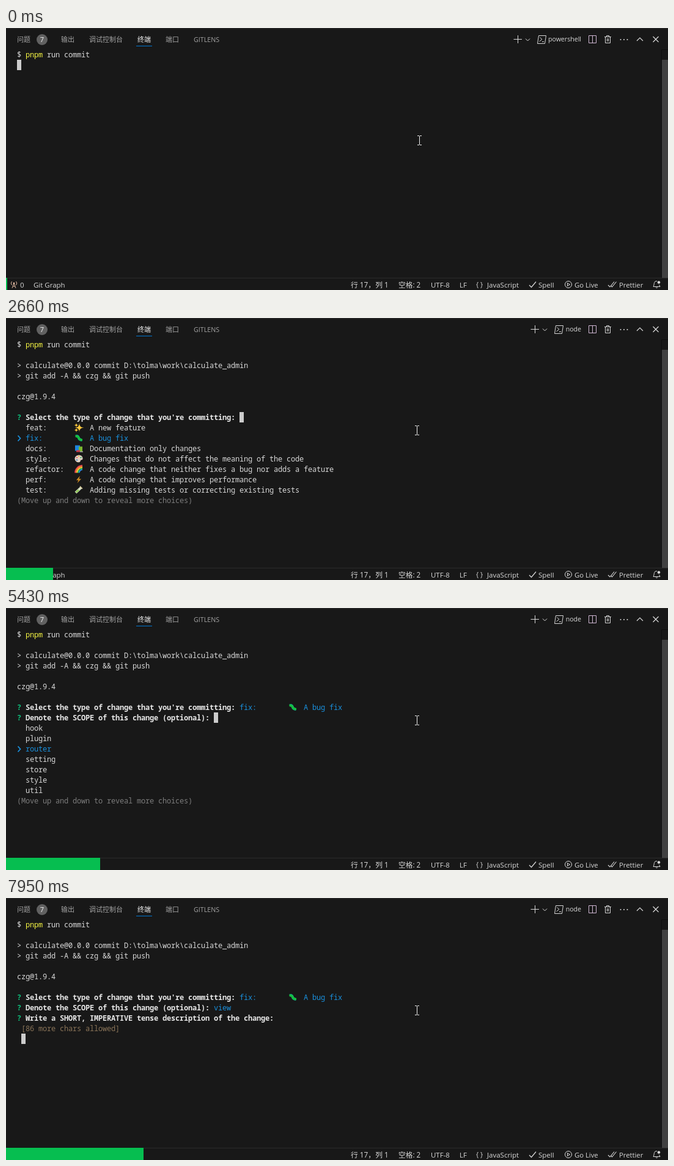
Write an HTML page with a canvas that moves like this. It is 1083 by 429 pixels and loops after 8 s.

```html
<!DOCTYPE html>
<html lang="zh-CN">
<head>
<meta charset="utf-8">
<title>Terminal commit</title>
<style>
html, body { margin: 0; width: 100%; height: 100%; overflow: hidden; background: #181818; }
canvas { display: block; }
</style>
</head>
<body>
<canvas id="stage" width="1083" height="429"></canvas>
<script>
const ctx = document.getElementById('stage').getContext('2d');
const LOOP = 8000, LEFT = 18, TOP = 35, CELL = 7, LINE = 17;
const FG = '#d8d8d8', WHITE = '#e8e8e8', BLUE = '#1a8fdb', GREEN = '#0dbc79', DIM = '#7c7c7c';
const UI = '"Open Sans", "Noto Sans CJK SC", "Noto Sans CJK", sans-serif';
const MONO = '"Noto Sans Mono", monospace';

const types = [
  ['feat:', 'A new feature'],
  ['fix:', 'A bug fix'],
  ['docs:', 'Documentation only changes'],
  ['style:', 'Changes that do not affect the meaning of the code'],
  ['refactor:', 'A code change that neither fixes a bug nor adds a feature'],
  ['perf:', 'A code change that improves performance'],
  ['test:', 'Adding missing tests or correcting existing tests']
];
const scopes = ['api', 'asset', 'component', 'enum', 'hook', 'plugin', 'router',
  'setting', 'store', 'style', 'util', 'view', '', 'empty'];

// Moments at which the terminal changes, in ms
const at = { hover: 300, run: 540, output: 670, czg: 1300, types: 2200, fix: 2590,
  scopes: 3080, firstDown: 4355, repeat: 205, done: 6640 };

// ---- drawing helpers ----
function box(x, y, w, h, color) {
  ctx.fillStyle = color;
  ctx.fillRect(x, y, w, h);
}
function dot(x, y, r, color) {
  ctx.fillStyle = color;
  ctx.beginPath();
  ctx.arc(x, y, r, 0, 7);
  ctx.fill();
}
function stroke(path, color = FG, width = 1) {
  ctx.strokeStyle = color;
  ctx.lineWidth = width;
  ctx.stroke(new Path2D(path));
}
function fill(path, color) {
  ctx.fillStyle = color;
  ctx.fill(new Path2D(path));
}
function label(text, x, y, size, color = FG, align = 'left') {
  ctx.font = `${size}px ${UI}`;
  ctx.textAlign = align;
  ctx.fillStyle = color;
  ctx.fillText(text, x, y);
}
function put(row, col, text, color = FG, bold = false) {
  ctx.font = `${bold ? 'bold ' : ''}12px ${MONO}`;
  ctx.textAlign = 'center';
  ctx.fillStyle = color;
  [...text].forEach((ch, i) => ctx.fillText(ch, LEFT + (col + i + 0.5) * CELL, TOP + row * LINE + 13));
}
function caret(row, col) {
  box(LEFT + col * CELL, TOP + row * LINE, CELL, LINE, '#cccccc');
}
function pointer(row) {
  const y = TOP + row * LINE + 9;
  stroke(`M19.5 ${y - 4.5}L23.5 ${y}L19.5 ${y + 4.5}`, BLUE, 1.8);
}

// ---- small pictures in the list, each centred on 0,0 ----
const star = (x, y, r) => fill(`M${x} ${y - r}Q${x} ${y} ${x + r} ${y}Q${x} ${y} ${x} ${y + r}` +
  `Q${x} ${y} ${x - r} ${y}Q${x} ${y} ${x} ${y - r}`, '#ffc83d');
const pictures = [
  () => { star(1, 0, 7.5); star(-4, -4, 4); star(-4, 4, 4); },
  () => {
    stroke('M-5 -3Q-1 -4 0 0Q1 3 5.5 3.5', '#12b886', 4);
    stroke('M-5.5 -3Q-1 -3 0 0Q1 3 6 3', '#16c03c', 3);
  },
  () => {
    box(-6, -5, 8, 9, '#1c86e0');
    box(0, -3, 6, 8, '#7cb82f');
    box(-4, 3, 6, 3, '#c43b4b');
    box(2, 5, 5, 1, '#e6e6e6');
  },
  () => {
    fill('M-6.5 0C-6 -8 7 -8 6.5 0C6 3 3 1 3 3C2 8 -6 6 -6.5 0', '#e0d2c4');
    [[-3, -2, '#e74856'], [0, -4, '#f5b82e'], [3.5, -2, '#16a34a'], [-3, 2, '#1c7ed6']]
      .forEach(([x, y, color]) => dot(x, y, 1.1, color));
  },
  () => ['#e83e55', '#ff8c2e', '#ffd23e', '#20b85a', '#278ee8'].forEach((color, i) => {
    const r = 12 - i * 1.7;
    stroke(`M${6 - r} 6A${r} ${r} 0 0 1 6 ${6 - r}`, color, 1.8);
  }),
  () => fill('M2 -6L-4 1H-0.5L-2.5 6L4 -1H0.5Z', '#d08b22'),
  () => {
    stroke('M-5 4.5L4 -4', '#d9e0c5', 4);
    stroke('M-4.5 4L0 0', '#8fc858', 3);
    stroke('M2 -6L6 -2', '#d8c89a', 1.5);
  }
];
function picture(index, row, col) {
  ctx.save();
  ctx.translate(LEFT + col * CELL + 10, TOP + row * LINE + 8.5);
  pictures[index]();
  ctx.restore();
}

// ---- window parts ----
function header(running) {
  box(0, 0, 1083, 1, '#2b2b2b');
  const grey = '#a2a2a2', y = 23;
  label('问题', 18, y, 11, grey);
  dot(59, 19, 9, '#616161');
  label('7', 59, y, 11, '#f8f8f8', 'center');
  label('输出', 90, y, 11, grey);
  label('调试控制台', 136, y, 11, grey);
  label('终端', 215, y, 11, '#f0f0f0');
  box(213, 29, 26, 1, '#0078d4');
  label('端口', 261, y, 11, grey);
  label('GITLENS', 307, y, 10.7, grey);

  label(running ? 'node' : 'powershell', 941, 22, 10.6, FG, 'right');
  ctx.save();
  ctx.translate(running ? 28 : 0, 0);
  stroke('M830.5 18.5H844M837.5 12V25');
  stroke('M850 17.5L853.5 21L857 17.5');
  stroke('M871.5 12.5H883.5L881.5 25.5H869.5ZM873.5 15.5L877 18.5L872.5 22M877 22.5H880');
  ctx.restore();

  stroke('M953.5 12.5H965.5V24.5H953.5ZM959.5 12.5V24.5', '#d0b8d4');
  stroke('M979 14.5H990M982.5 14V12.5H986.5V14M980.5 15V24.5H988.5V15M983.5 17V22M985.5 17V22');
  [1005.5, 1011, 1016.5].forEach(x => dot(x, 19, 1, FG));
  stroke('M1032 21L1037 16L1042 21', FG, 1.2);
  stroke('M1058.5 14L1067.5 23M1067.5 14L1058.5 23', FG, 1.2);
}

function scrollbar() {
  box(1072, 35, 1, 374, '#0e0e0e');
  box(1073, 35, 10, 1, '#0e0e0e');
  box(1073, 52, 10, 357, '#404040');
}

function statusBar(t) {
  box(0, 409, 1083, 1, '#2b2b2b');
  const y = 425;
  stroke('M10 426L13 418L16 426M11 423H15M9.5 415Q7 418 9.5 421M16.5 415Q19 418 16.5 421', '#e0b8a0');
  dot(13, 418, 1.4, '#e0b8a0');
  label('0', 23, y, 11.5);
  label('Git Graph', 45, y, 11.5);
  label('行 17，列 1', 564, y, 11.8);
  label('空格: 2', 642, y, 11.7);
  label('UTF-8', 695, y, 11.5);
  label('LF', 742, y, 11.5);
  label('{ }', 769, y - 1, 11);
  label('JavaScript', 787, y, 11.5);
  stroke('M856 421L859.5 424.5L867 415.5', FG, 1.2);
  label('Spell', 871, y, 11.5);
  stroke('M925.5 420A5.5 5.5 0 1 1 914.5 420A5.5 5.5 0 1 1 925.5 420M918.5 417.5V422.5L922.5 420Z');
  label('Go Live', 930, y, 11.3);
  stroke('M985 421L988 424L995 415.5M990 422.5L991.5 424L998.5 415.5', FG, 1.1);
  label('Prettier', 1003, y, 11.3);
  stroke('M1065 414.5C1059 414 1061 420 1059 423.5H1070L1068.5 420.5M1063 424.5Q1064.5 427 1066 424.5');
  dot(1068, 416.5, 2.3, FG);
  box(0, 409, Math.floor(2.5 + t * 0.028), 20, '#06be50');
}

function mouse(t) {
  const x = t < at.hover ? 676 : 672;
  stroke(`M${x - 3} 176.5H${x}M${x + 1} 176.5H${x + 4}M${x + 0.5} 177V191M${x - 3} 191.5H${x}M${x + 1} 191.5H${x + 4}`, '#f0f0f0');
}

// ---- terminal contents ----
function question(row, text) {
  put(row, 0, '?', GREEN, true);
  put(row, 2, text, WHITE, true);
  return text.length + 3;
}
function searchField(row, col, untouched) {
  const hint = untouched ? 'Use arrow keys or type to search' : '';
  put(row, col, hint, DIM);
  caret(row, col + hint.length);
}
const moreChoices = row => put(row, 0, '(Move up and down to reveal more choices)', DIM);

function typeList(t) {
  const selected = t < at.fix ? 0 : 1;
  types.forEach(([name, text], i) => {
    const row = 8 + i, color = i === selected ? BLUE : FG;
    if (i === selected) pointer(row);
    put(row, 2, name, color);
    picture(i, row, 13);
    put(row, 17, text, color);
  });
  moreChoices(15);
}

function scopeList(selected) {
  const first = Math.max(0, selected - 2);
  for (let i = 0; i < 7; i++) {
    const index = first + i, row = 9 + i, name = scopes[index % scopes.length];
    if (index === selected) pointer(row);
    if (name) put(row, 2, name, index === selected ? BLUE : FG);
    else box(25, TOP + row * LINE + 9, 98, 1, '#666666');
  }
  moreChoices(16);
}

function terminal(t) {
  put(0, 0, '$');
  put(0, 2, 'pnpm', '#f5f543');
  put(0, 7, 'run commit');
  if (t >= at.hover && t < at.fix) box(1, 36, 2, 338, '#3c3c3c');
  if (t < at.output) return caret(1, 0);

  put(2, 0, '> calculate@0.0.0 commit D:\\tolma\\work\\calculate_admin');
  put(3, 0, '> git add -A && czg && git push');
  if (t < at.czg) return caret(5, 0);

  put(5, 0, 'czg@1.9.4');
  if (t < at.types) return caret(7, 0);

  const typeCol = question(7, "Select the type of change that you're committing:");
  if (t < at.scopes) {
    searchField(7, typeCol, t < at.fix);
    return typeList(t);
  }
  put(7, typeCol, 'fix:', BLUE);
  picture(1, 7, 63);
  put(7, 67, 'A bug fix', BLUE);

  const scopeCol = question(8, 'Denote the SCOPE of this change (optional):');
  if (t < at.done) {
    const downs = Math.floor((t - at.firstDown) / at.repeat) + 1;
    const selected = Math.min(11, Math.max(0, downs));
    searchField(8, scopeCol, selected === 0);
    return scopeList(selected);
  }
  put(8, scopeCol, 'view', BLUE);
  question(9, 'Write a SHORT, IMPERATIVE tense description of the change:');
  put(10, 1, '[86 more chars allowed]', '#8a7458');
  caret(11, 1);
}

function draw() {
  const t = performance.now() % LOOP;
  box(0, 0, 1083, 429, '#181818');
  header(t >= at.run);
  scrollbar();
  terminal(t);
  statusBar(t);
  mouse(t);
  requestAnimationFrame(draw);
}
draw();
</script>
</body>
</html>
```
